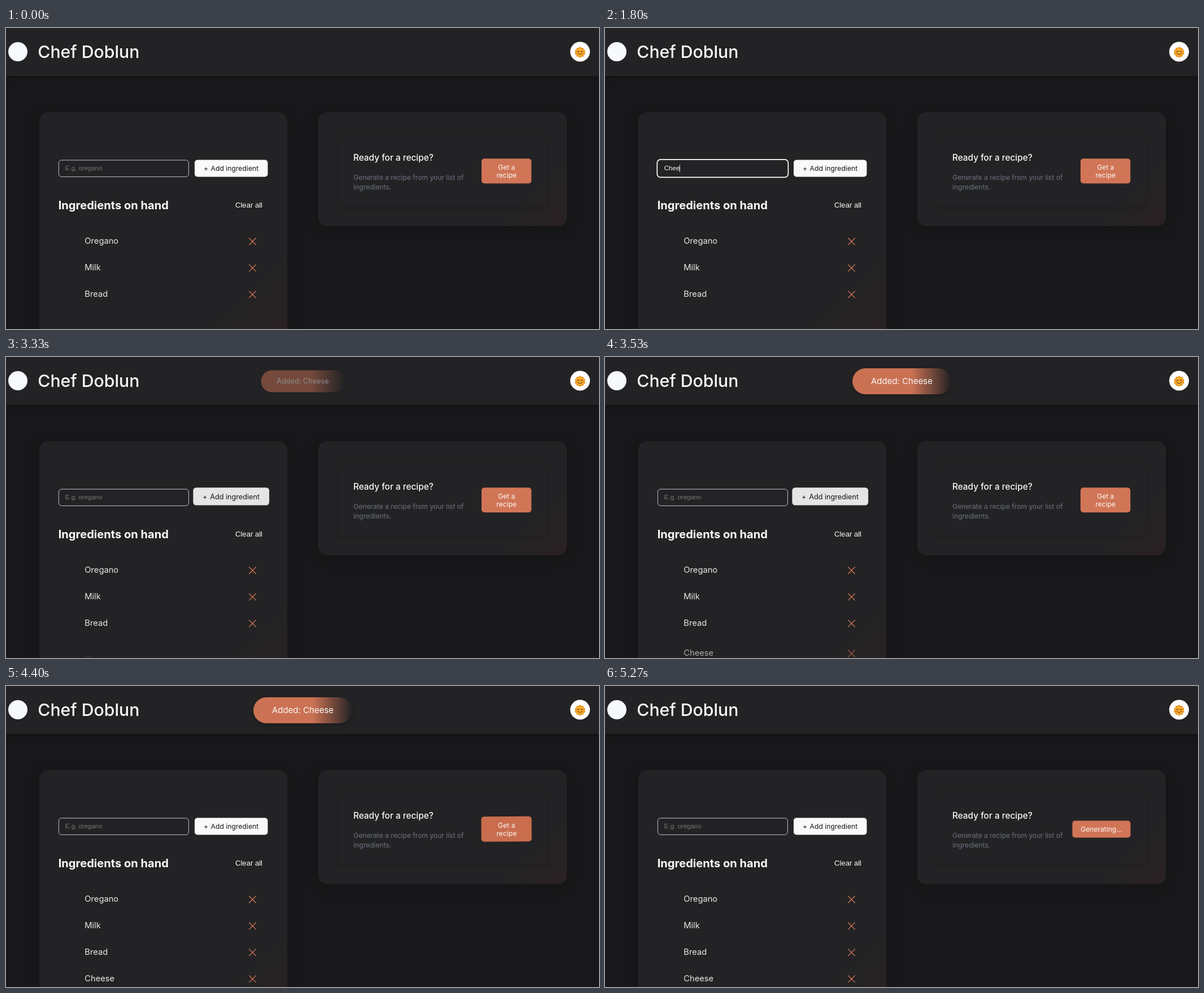
Recreate the animation shown at these times as an HTML page. Size 1050 by 533 pixels, loop 8000 ms.

```html
<!DOCTYPE html>
<html lang="en">
<head>
<meta charset="utf-8">
<title>Recipe helper</title>
<style>
  html, body { margin: 0; width: 100%; height: 100%; overflow: hidden; background: #18181a; }
  #stage { position: relative; width: 1050px; height: 533px; overflow: hidden; background: #18181a; font-family: Inter, sans-serif; }
  #stage > * { position: absolute; box-sizing: border-box; }
  header { left: 0; top: 0; width: 1050px; height: 85px; background: #232325; box-shadow: 0 2px 7px rgba(0, 0, 0, .35); }
  .card { top: 149px; width: 439.5px; border-radius: 16px; box-shadow: 0 5px 20px rgba(0, 0, 0, .15);
    background: linear-gradient(135deg, #232325 81%, #2b2122); }
  #list { left: 58.5px; }
  #ask { left: 553px; height: 202px; }
  #panel { left: 587px; top: 188px; width: 371.5px; height: 129px; border-radius: 8px; box-shadow: 0 2px 5px rgba(0, 0, 0, .18); }
  #toast { left: 438px; top: 20px; width: 175px; height: 46px; border-radius: 23px; color: #fafaf8;
    background: linear-gradient(90deg, #cb7254 60%, transparent); box-shadow: 0 3px 9px rgba(0, 0, 0, .2);
    font-size: 15px; line-height: 46px; text-align: center; white-space: nowrap; }
  svg { left: 0; top: 0; }
  text { fill: #fafaf8; white-space: pre; }
  .title { font-size: 30.2px; font-weight: 500; }
  .head { font-size: 20.1px; font-weight: 700; }
  .ask { font-size: 15.4px; font-weight: 500; }
  .item { font-size: 14.7px; fill: #e8e8e8; }
  .small { font-size: 12.08px; }
  .dim { fill: #6b7280; }
  .add { font-size: 12.2px; fill: #18181a; }
  .plain { font-family: "Liberation Sans", Arial, sans-serif; font-size: 11.51px; }
  .clear { font-size: 13.1px; }
  .mid { text-anchor: middle; }
</style>
</head>
<body>
<div id="stage">
  <header></header>
  <div id="list" class="card"></div>
  <div id="ask" class="card"></div>
  <div id="panel"></div>

  <svg width="1050" height="533" viewBox="0 0 1050 533">
    <circle cx="21" cy="42" r="17" fill="#f7fafc"/>
    <text class="title" x="56.3" y="52.8">Chef Doblun</text>

    <circle cx="1016.5" cy="42" r="17.5" fill="#fff"/>
    <g id="sun" transform="translate(1016.5 43)"></g>

    <rect id="field" fill="none"/>
    <text id="typed" class="plain" x="104.8" y="252.4"></text>
    <rect id="caret" y="242.5" width="1" height="12.5" fill="#fff"/>

    <g id="add">
      <rect id="addBox" x="334" y="233.5" width="129.5" height="30" rx="5"/>
      <text class="add" x="350" y="253">+</text>
      <text class="add" x="362.6" y="253">Add ingredient</text>
    </g>

    <text class="head" x="92.7" y="321.4">Ingredients on hand</text>
    <text class="plain clear" x="406" y="318.2">Clear all</text>
    <g id="items"></g>

    <text class="ask" x="614.9" y="235.1">Ready for a recipe?</text>
    <text class="small dim" x="615.3" y="269">Generate a recipe from your list of</text>
    <text class="small dim" x="615.3" y="286.2">ingredients.</text>

    <g id="get">
      <rect class="face" x="842" y="231.3" width="88.3" height="44" rx="5"/>
      <text class="small mid" x="886.3" y="251">Get a</text>
      <text class="small mid" x="886.3" y="265.2">recipe</text>
    </g>
    <g id="busy">
      <rect class="face" x="827.5" y="238.4" width="103" height="30" rx="5"/>
      <text class="small mid" x="879" y="257.9">Generating...</text>
    </g>
  </svg>

  <div id="toast">Added: Cheese</div>
</div>

<script>
const LOOP = 8000;
const FOCUS = 670, SUBMIT = 3200, CLICK = 4730, BLINK = 530;
const KEYS = [1270, 1470, 1670, 1800, 2070, 2130];
const WORD = "Cheese";
const ROW = 46.9;
const $ = id => document.getElementById(id);

// CSS-style cubic easing, solved by bisection
function bezier(x1, y1, x2, y2) {
  const at = (a, b, u) => 3 * a * u * (1 - u) ** 2 + 3 * b * u * u * (1 - u) + u ** 3;
  return x => {
    let lo = 0, hi = 1;
    for (let i = 0; i < 24; i++) {
      const m = (lo + hi) / 2;
      if (at(x1, x2, m) < x) lo = m; else hi = m;
    }
    return at(y1, y2, lo);
  };
}
const ease = bezier(.25, .1, .25, 1);
const easeOut = bezier(0, 0, .58, 1);

const ramp = (t, start, length, curve = ease) => {
  const p = (t - start) / length;
  return p <= 0 ? 0 : p >= 1 ? 1 : curve(p);
};
const mix = (a, b, p) => `color-mix(in srgb, ${b} ${p * 100}%, ${a})`;
const show = (el, on) => { el.style.display = on ? "" : "none"; };
const set = (el, attrs) => { for (const k in attrs) el.setAttribute(k, attrs[k]); };

$("items").innerHTML = ["Oregano", "Milk", "Bread", WORD].map((name, i) =>
  `<g><text class="item" x="139.3" y="${382.4 + ROW * i}">${name}</text>
   <path d="M430.3 ${371.8 + ROW * i}l12.4 12.4m0 -12.4l-12.4 12.4" stroke="#d17557" stroke-width="1.3"/></g>`).join("");
const newItem = $("items").lastElementChild;

const rays = Array.from({ length: 10 }, (_, i) => {
  const a = i * Math.PI / 5 - Math.PI / 2;
  return `<circle cx="${7 * Math.cos(a)}" cy="${7 * Math.sin(a)}" r="2.4" fill="#e8921c"/>`;
}).join("");
$("sun").innerHTML = rays + `<circle r="7" fill="#f8b02c"/>
  <circle cx="-4.3" cy="1.4" r="1.5" fill="#ee8a2c"/><circle cx="4.3" cy="1.4" r="1.5" fill="#ee8a2c"/>
  <path d="M-4.6 -1q1.6 -2.2 3.2 0M1.4 -1q1.6 -2.2 3.2 0M-3.2 2.2q3.2 3.6 6.4 0" fill="none" stroke="#6b3d12" stroke-width="1.1" stroke-linecap="round"/>`;

function drawField(t) {
  const focused = t >= FOCUS && t < SUBMIT;
  const count = t < SUBMIT ? KEYS.filter(k => t >= k).length : 0;
  set($("field"), focused
    ? { x: 92.3, y: 232.95, width: 232.1, height: 31.5, rx: 6, stroke: "#fff", "stroke-width": 1.7 }
    : { x: 93.4, y: 234, width: 230, height: 29.4, rx: 5, stroke: "#d1d5db", "stroke-width": .9 });
  const typed = $("typed");
  typed.textContent = count ? WORD.slice(0, count) : "E.g. oregano";
  typed.style.fill = count ? "#fafaf8" : "#757575";
  const last = count ? KEYS[count - 1] : FOCUS;
  show($("caret"), focused && Math.floor((t - last) / BLINK) % 2 === 0);
  $("caret").setAttribute("x", 104.3 + (count ? typed.getComputedTextLength() : 0));
}

function drawButtons(t) {
  const over = ramp(t, 2960, 300) - ramp(t, 3580, 300);
  set($("add"), { transform: `translate(398.75 ${248.5 - 1.6 * over}) scale(${1 + .04 * over}) translate(-398.75 -248.5)` });
  $("addBox").style.fill = mix("#fafaf8", "#e5e5e5", over);

  const tilt = ramp(t, 4355, 300) - ramp(t, 4890, 300);
  for (const [id, cx] of [["get", 886.25], ["busy", 879]]) {
    const el = $(id);
    show(el, (id === "busy") === (t >= CLICK));
    set(el, { transform: `translate(${cx} 253.5) rotate(${-2 * tilt}) scale(${1 + .05 * tilt}) translate(${-cx} -253.5)` });
    el.querySelector(".face").style.fill = mix("#d17557", "#a84a2a", tilt);
  }
}

function drawResult(t) {
  $("list").style.height = (t < SUBMIT ? 405 : 452) + "px";
  const rise = ramp(t, 3250, 700);
  newItem.style.opacity = rise;
  set(newItem, { transform: `translate(0 ${20 * (1 - rise)})` });

  const pop = ramp(t, 3225, 320, easeOut) - ramp(t, 4960, 300, easeOut);
  $("toast").style.opacity = pop;
  $("toast").style.transform = `scale(${.7 + .3 * pop})`;
}

function draw(now) {
  const t = now % LOOP;
  drawField(t);
  drawButtons(t);
  drawResult(t);
}

const begin = performance.now();
function tick() {
  draw(performance.now() - begin);
  requestAnimationFrame(tick);
}
tick();
</script>
</body>
</html>
```
